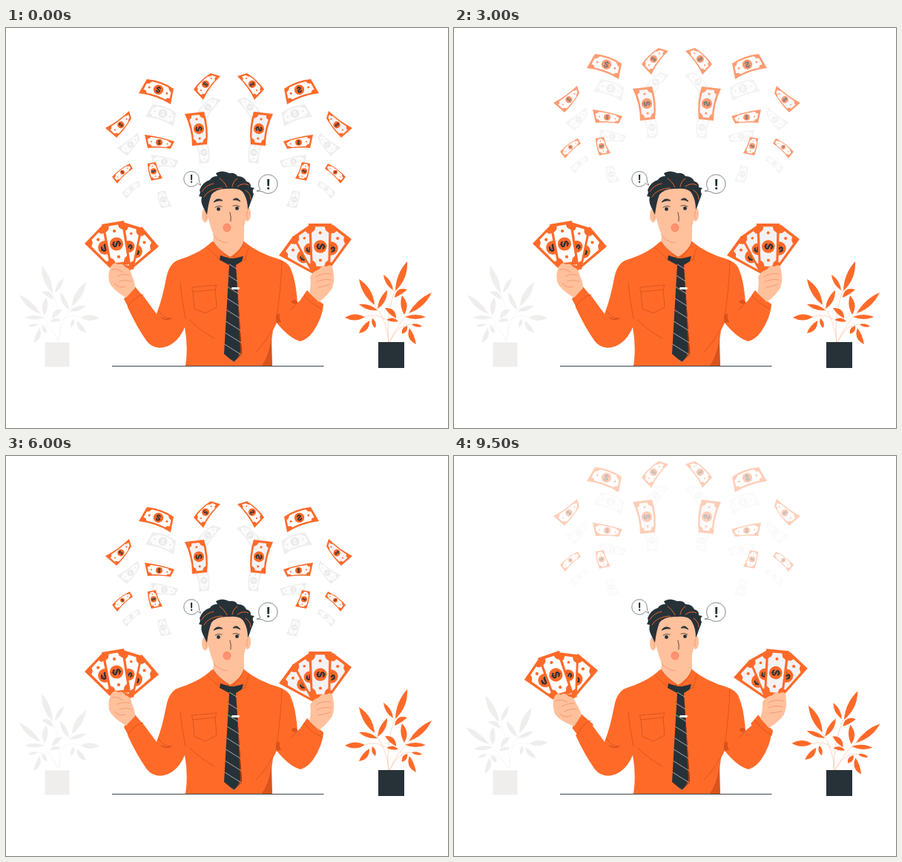
Recreate the animation shown at these times as an HTML page. Size 596 by 540 pixels, loop 10 s.

```html
<!DOCTYPE html>
<html lang="en">
<head>
<meta charset="utf-8">
<title>Money rain</title>
<style>
html, body { margin: 0; width: 100%; height: 100%; overflow: hidden; background: #fff; }
svg { display: block; width: 596px; height: 540px; }
text { font-family: Inter, Arial, sans-serif; font-weight: 700; text-anchor: middle; fill: #263238; }
.o { fill: #ff6a29; }
.k { fill: #263238; }
.skin { fill: #ffc09c; }
.fold { fill: none; stroke: #cf4d17; stroke-width: .7; stroke-linecap: round; }
.ink { fill: none; stroke: #263238; stroke-width: .8; stroke-linecap: round; }
.crease { fill: none; stroke: #ef9368; stroke-width: .8; stroke-linecap: round; }
.strand { fill: none; stroke: #ff6a29; stroke-width: .9; stroke-linecap: round; }
</style>
</head>
<body>
<svg viewBox="0 0 596 540">
  <defs>
    <clipPath id="tieClip"><path d="M301 318L311 317L318 440L307 451L294 440Z"/></clipPath>
    <g id="leaves"></g>
  </defs>

  <g id="rain"></g>

  <g transform="matrix(-.92 0 0 .93 546 28)" fill="#f0eded" stroke="#f5f3f3"><use id="plantL" href="#leaves"/></g>
  <rect x="52.5" y="424.5" width="33" height="33" fill="#f0eded"/>
  <g fill="#ff6a29" stroke="#ffc4aa"><use id="plantR" href="#leaves"/></g>
  <rect class="k" x="502" y="424" width="35" height="35"/>

  <!-- arms and shirt -->
  <path class="o" d="M277 289Q262 304 233 313Q220 317 216 338Q211 365 203 386L183 359L164 377Q177 405 190 423Q199 434 213 431Q231 427 241 404Q246 430 242 456H359Q356 430 360 408L365 398Q382 419 397 423Q407 420 414 410Q427 391 428 373L408 358L393 371Q391 340 383 323Q379 316 368 312Q340 304 322 289Z"/>
  <path d="M359 456H345Q355 441 358 418Z" fill="#d9531b"/>
  <path d="M203 386Q211 395 225 391Q220 396 211 393Z M393 371Q390 363 384 370L389 373Z M364 388L369 385Q368 392 371 397L365 398Z" fill="#d9531b"/>
  <path class="fold" d="M235 345Q237 368 242 392 M247 394Q263 409 281 419 M206 382Q211 391 222 392 M372 315Q371 352 364 396 M393 371Q388 378 383 381 M358 408Q350 425 337 437 M251 350L284 347L282 353L252 356Z M252 356L254 379L269 385L284 377L282 353"/>

  <!-- head -->
  <path class="skin" d="M281 270L279 290Q290 304 302 309Q313 303 321 290L321 265Z"/>
  <ellipse class="skin" cx="268.500" cy="253" rx="4.500" ry="9.500"/>
  <ellipse class="skin" cx="325.500" cy="251" rx="4.500" ry="10"/>
  <path class="skin" d="M270 225Q270 250 275 265Q280 288 298 289Q317 285 322 264Q328 240 326 216L300 204L276 212Z"/>
  <path class="crease" d="M279 278Q285 289 299 290 M268 248Q271 252 270 258 M326 246Q324 251 325 257"/>
  <path class="k" d="M271 252L266 242Q262 234 264 228L260 227Q263 222 261 219Q265 208 275 205Q278 200 285 200L283 196Q291 191 301 196Q309 195 312 200Q321 200 324 207Q331 209 330 215L335 216Q331 219 334 224Q332 231 330 235Q328 242 326 245Q326 233 321 224Q317 215 300 217Q284 216 277 225Q273 235 271 252Z"/>
  <path class="strand" d="M267 228Q273 217 291 216 M264 221Q269 212 280 210 M288 203Q294 207 298 215 M305 214Q306 207 312 203 M312 214Q320 208 327 212 M323 219Q330 223 330 231"/>
  <path class="k" d="M280 235Q285 228 292 233Q286 232 280 235Z M306 232Q311 227 316 234Q311 231 306 232Z" stroke="#263238" stroke-width="1"/>
  <circle class="k" cx="286.500" cy="244.500" r="2.400"/>
  <circle class="k" cx="311.500" cy="243.500" r="2.400"/>
  <path class="ink" d="M282 242Q286 239 291 241 M306 240Q311 238 315 241" stroke-width=".5"/>
  <path class="ink" d="M302 249Q304 255 303 261"/>
  <ellipse cx="298" cy="269.500" rx="5" ry="5.200" fill="#ff9270" stroke="#f4774d" stroke-width=".7"/>

  <!-- collar and tie -->
  <path class="o" d="M279 288L272 297L289 314L302 309Q286 300 279 288Z M321 288L327 297L322 315L304 309Q316 301 321 288Z"/>
  <path class="fold" d="M272 297L289 313L301 309Q286 299 279 288 M327 297L322 314L306 309Q317 300 321 288"/>
  <path class="k" d="M289 307L302 311L308 311L320 308L318 315L310 320L318 440L307 451L294 440L301 320L288 313Z"/>
  <path d="M310 320L318 440L312 446L316 436Z" fill="#a83a10"/>
  <path id="stripes" clip-path="url(#tieClip)" fill="none" stroke="#c9c4c2" stroke-width=".8"/>
  <path d="M305.500 351.500H313.500" stroke="#fff" stroke-width="2.800" stroke-linecap="round"/>

  <!-- hands with fans -->
  <g id="handL">
    <path class="o" d="M159 366Q166 354 173 348L188 366L167 381Z"/>
    <path class="fold" d="M164 376Q174 362 185 360"/>
    <g id="fanL"></g>
    <path class="skin" d="M162 364Q144 354 139 343Q137 329 142 321Q146 315 151 319Q158 317 161 323Q168 324 170 335Q174 343 174 351Z"/>
    <path class="crease" d="M143 326Q150 324 158 330 M150 335Q159 331 167 334 M153 342Q162 339 169 342 M146 345Q152 352 161 349"/>
  </g>
  <g id="handR">
    <path class="o" d="M406 354L397 367L416 385L427 380L428 373Q417 366 406 354Z"/>
    <path class="fold" d="M402 361Q411 373 426 379"/>
    <g id="fanR"></g>
    <path class="skin" d="M422 370L409 358Q412 345 410 336Q414 328 422 326Q425 320 432 322Q440 317 441 327Q444 340 440 351Q433 362 422 370Z"/>
    <path class="crease" d="M418 336Q427 330 438 332 M419 343Q428 338 438 340 M421 350Q429 349 437 346"/>
  </g>

  <!-- speech bubbles -->
  <g fill="#fff" stroke="#4b5559" stroke-width=".7">
    <path d="M258.500 209.500A10.200 10.200 0 1 1 260.200 204.500Q260 209 263 212Q260 212 258.500 209.500Z"/>
    <path d="M343 218A12.700 12.700 0 1 1 346 221Q342 220 338 220Q341 220 343 218Z"/>
  </g>
  <text x="250" y="209" font-size="14">!</text>
  <text x="353.800" y="217.500" font-size="19">!</text>

  <path d="M143 456.500H428.500" stroke="#263238" stroke-width=".9"/>
</svg>

<script>
const $ = id => document.getElementById(id);
const ORANGE = { edge: '#ff6a29', paper: '#fff', coin: '#ff6a29', sign: '#263238' };
const TINTED = { ...ORANGE, paper: '#f4f2f5' };
const PALE = { edge: '#efeeef', paper: '#fcfcfc', coin: '#e9e8ea', sign: '#fafafa' };

// A banknote between long edges ab and dc; bow bends it towards d.
function bill([ax, ay, bx, by, cx, cy, dx, dy], bow, ink) {
  const nx = dx - ax, ny = dy - ay, n = Math.hypot(nx, ny);
  const width = (n + Math.hypot(cx - bx, cy - by)) / 2;
  const at = (u, v) => {
    const k = bow * 4 * u * (1 - u) / n;
    const mix = (a, b, c, d) => (a + (b - a) * u) * (1 - v) + (d + (c - d) * u) * v;
    return [mix(ax, bx, cx, dx) + nx * k, mix(ay, by, cy, dy) + ny * k].map(q => +q.toFixed(1));
  };
  const steps = [0, .25, .5, .75, 1];
  const shape = (pts, fill) => `<polygon points="${pts.map(p => at(...p)).join(' ')}" fill="${fill}"/>`;
  const band = (u0, u1, v) => steps.map(s => [u0 + (u1 - u0) * s, v]);
  const dot = (u, v, r, fill) => {
    const [x, y] = at(u, v);
    return `<circle cx="${x}" cy="${y}" r="${r.toFixed(1)}" fill="${fill}"/>`;
  };
  const [x, y] = at(.5, .5), turn = Math.atan2(by - ay + cy - dy, bx - ax + cx - dx) * 180 / Math.PI;
  const size = width * .5;
  return shape([...band(0, 1, 0), ...band(1, 0, 1)], ink.edge)
    + shape([...band(.2, .8, .11), [.85, .25], [.93, .3], [.93, .7], [.85, .75],
             ...band(.8, .2, .89), [.15, .75], [.07, .7], [.07, .3], [.15, .25]], ink.paper)
    + dot(.5, .5, width * .31, ink.coin)
    + dot(.2, .5, width * .07, ink.coin) + dot(.8, .5, width * .07, ink.coin)
    + `<text transform="translate(${x} ${y}) rotate(${turn.toFixed(0)})" y="${(size * .36).toFixed(1)}" font-size="${size.toFixed(1)}" style="fill:${ink.sign}">$</text>`;
}

// corners, bow, then shift and scale of the pale echo
const flying = [
  [[190, 69, 226, 82, 222, 103, 179, 88], -2.5, 6, 32, .88],
  [[276, 61, 253, 83, 266, 97, 289, 65], -2, 3, 31, .9],
  [[241, 116, 251, 159, 271, 157, 267, 113], 2.5, 7, 32, .65],
  [[166, 112, 134, 135, 149, 148, 169, 122], 1.5, 13, 27, .88],
  [[187, 144, 227, 153, 222, 163, 191, 162], -1, 7, 26, .92],
  [[167, 183, 143, 201, 150, 210, 171, 190], -1.5, 12, 22, .9],
  [[191, 183, 196, 206, 211, 203, 202, 181], -1, 13, 38, .95],
];
const echoes = flying.map(([p, bow, dx, dy, s]) => {
  const cx = (p[0] + p[2] + p[4] + p[6]) / 4, cy = (p[1] + p[3] + p[5] + p[7]) / 4;
  return bill(p.map((q, i) => i % 2 ? cy + dy + (q - cy) * s : cx + dx + (q - cx) * s), bow, PALE);
}).join('');
const side = tinted => echoes + flying.map(([p, bow], i) =>
  bill(p, bow, i === 2 || (tinted && i === 3) ? TINTED : ORANGE)).join('');
$('rain').innerHTML = side(false) + `<g transform="matrix(-1 0 0 1 601 0)">${side(true)}</g>`;

const fan = (bills, ink) => bills.map(p => bill(p, 0, ink)).join('');
$('fanL').innerHTML = fan([
  [183, 268, 146, 312, 163, 331, 206, 295],
  [158, 262, 148, 322, 172, 326, 184, 270],
  [106, 291, 140, 324, 158, 305, 130, 266],
  [129, 265, 140, 322, 168, 319, 159, 260],
], ORANGE);
$('fanR').innerHTML = fan([
  [368, 307, 418, 334, 432, 312, 387, 281],
  [386, 282, 411, 328, 432, 318, 409, 266],
  [440, 265, 412, 314, 436, 326, 466, 285],
  [408, 264, 411, 326, 437, 326, 439, 264],
], TINTED);

// base, tip, width, bend
const leaves = [
  [543, 385, 574, 357, 8, 1], [525, 355, 541, 315, 9, 1], [522, 354, 509, 333, 6, 0],
  [524, 364, 541, 353, 7, -5], [497, 374, 476, 339, 9, 1], [501, 379, 514, 354, 7, 1],
  [501, 381, 476, 373, 6, 0], [484, 390, 457, 391, 8, 0], [526, 392, 511, 378, 7, 4],
  [537, 387, 534, 361, 8, 2], [538, 390, 566, 390, 6, 0], [529, 396, 513, 394, 5, 2],
  [490, 395, 476, 412, 7, -3], [498, 405, 494, 392, 5, 0], [547, 400, 561, 403, 4, 0],
  [541, 402, 534, 413, 6, 0], [544, 405, 553, 427, 7, 4],
];
const leaf = ([x, y, tx, ty, w, bend]) => {
  const len = Math.hypot(tx - x, ty - y), nx = (y - ty) / len, ny = (tx - x) / len;
  const ctrl = k => `${((x + tx) / 2 + nx * k).toFixed(1)} ${((y + ty) / 2 + ny * k).toFixed(1)}`;
  return `M${x} ${y}Q${ctrl(bend + w)} ${tx} ${ty}Q${ctrl(bend - w)} ${x} ${y}Z`;
};
$('leaves').innerHTML =
  '<path d="M516 424Q514 395 497 374 M516 424Q512 390 524 355 M517 424Q528 400 543 385 M517 424Q530 398 547 400 M512 394Q500 384 484 390" fill="none" stroke-width=".7"/>'
  + `<path d="${leaves.map(leaf).join('')}" stroke="none"/>`;

let stripes = '';
for (let y = 312; y < 450; y += 16) stripes += `M290 ${y}L322 ${y + 20}`;
$('stripes').setAttribute('d', stripes);

// The picture holds for 500 ms; notes rise over four steps, the rest sways over two.
const rise = [0, -17, -34, -54], fade = [1, 1, .66, .33];
const turn = (id, angle, x, y) => $(id).setAttribute('transform', `rotate(${angle} ${x} ${y})`);
function draw(now) {
  const step = Math.floor(now % 10000 / 500) % 4, sway = step % 2;
  $('rain').setAttribute('transform', `translate(0 ${rise[step]})`);
  $('rain').setAttribute('opacity', fade[step]);
  turn('handL', -9.5 * sway, 167, 364);
  turn('handR', 5.7 * sway, 453, 394);
  turn('plantL', 5.5 * sway, 512, 380);
  turn('plantR', 3.7 * sway, 507, 368);
}
const start = performance.now();
function tick() {
  draw(performance.now() - start);
  requestAnimationFrame(tick);
}
tick();
</script>
</body>
</html>
```
